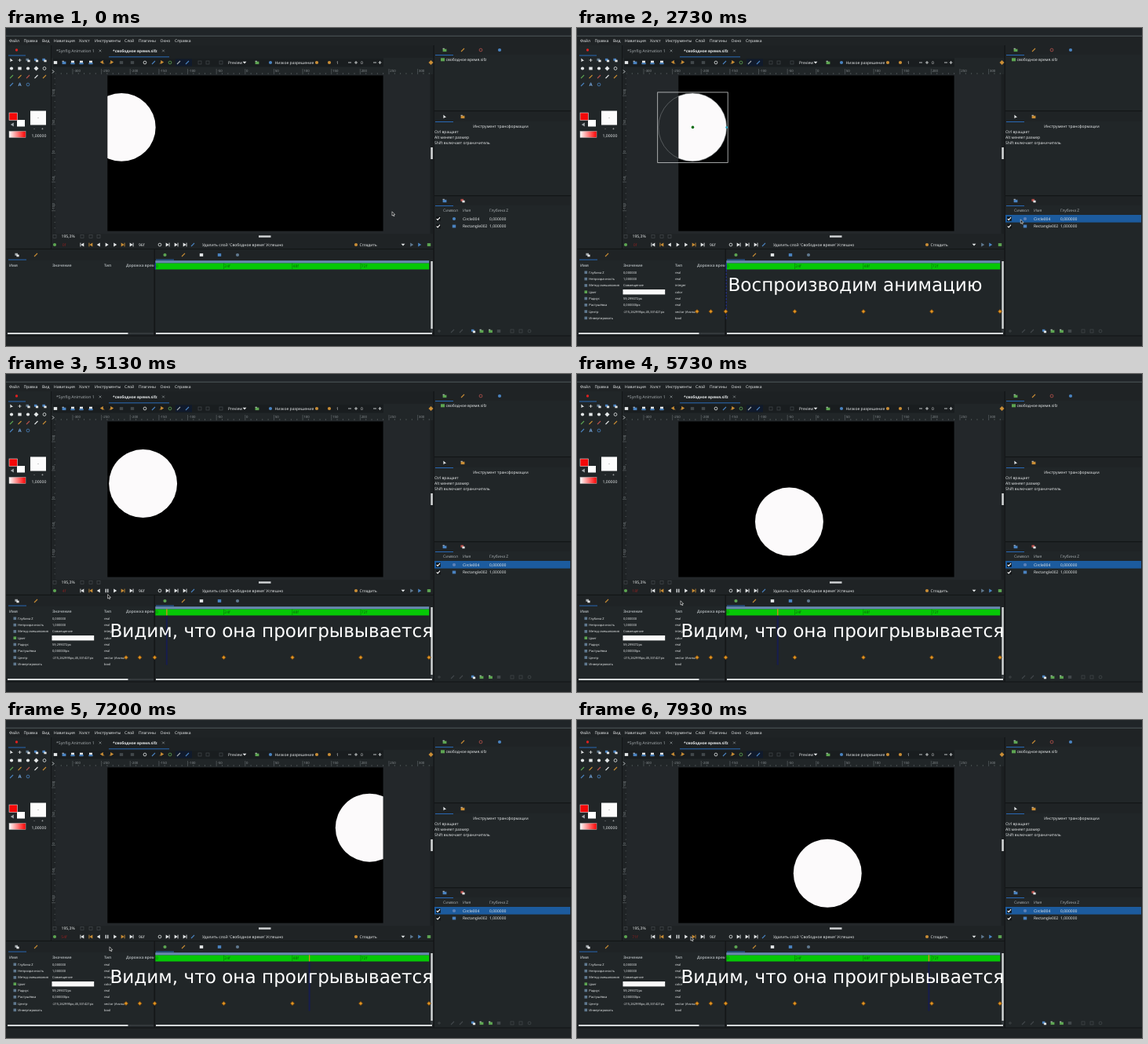
An HTML page with a canvas that plays this animation: 720 px wide and 405 px high, repeating every 8000 ms.

```html
<!DOCTYPE html>
<html lang="ru">
<head>
<meta charset="utf-8">
<style>
html, body { margin: 0; width: 100%; height: 100%; overflow: hidden; background: #1f2325; }
canvas { display: block; width: 720px; height: 405px; }
</style>
</head>
<body>
<canvas id="stage" width="720" height="405"></canvas>
<script>
const ctx = document.getElementById('stage').getContext('2d');
const LOOP = 8000, TICK = 1000 / 15;
const SELECT_AT = 1870, CAPTION_AT = 2730, PLAY_AT = 4930;
const UI = '"Noto Sans", "Open Sans", sans-serif';
const WHITE = '#e4e7e8', GREY = '#a3a9ac', DIM = '#42484b';
const BLUE = '#4a83c0', SLATE = '#60798f', GREEN = '#5da552', GOLD = '#c98d35', RED = '#b8524c';

function rect(x, y, w, h, color) {
  ctx.fillStyle = color;
  ctx.fillRect(x, y, w, h);
}

function outline(x, y, w, h, color, width = 0.7) {
  ctx.strokeStyle = color;
  ctx.lineWidth = width;
  ctx.strokeRect(x, y, w, h);
}

function disc(x, y, r, color) {
  ctx.fillStyle = color;
  ctx.beginPath();
  ctx.arc(x, y, r, 0, 7);
  ctx.fill();
}

function ring(x, y, r, color, width = 0.8) {
  ctx.strokeStyle = color;
  ctx.lineWidth = width;
  ctx.beginPath();
  ctx.arc(x, y, r, 0, 7);
  ctx.stroke();
}

function poly(points, color) {
  ctx.fillStyle = color;
  ctx.beginPath();
  points.forEach(([x, y]) => ctx.lineTo(x, y));
  ctx.fill();
}

function line(x1, y1, x2, y2, color, width = 0.8) {
  ctx.strokeStyle = color;
  ctx.lineWidth = width;
  ctx.beginPath();
  ctx.moveTo(x1, y1);
  ctx.lineTo(x2, y2);
  ctx.stroke();
}

// y is the vertical middle of the line of text
function text(str, x, y, { size = 5, color = WHITE, weight = 400, align = 'left' } = {}) {
  ctx.font = `${weight} ${size}px ${UI}`;
  ctx.textAlign = align;
  ctx.fillStyle = color;
  ctx.fillText(str, x, y + size * 0.36);
}

function clipped(x, y, w, h, paint) {
  ctx.save();
  ctx.beginPath();
  ctx.rect(x, y, w, h);
  ctx.clip();
  paint();
  ctx.restore();
}

const shapes = {
  dot: (x, y, c) => disc(x, y, 2.1, c),
  ring: (x, y, c) => ring(x, y, 1.9, c),
  sq: (x, y, c) => rect(x - 2.2, y - 1.9, 4.4, 3.8, c),
  box: (x, y, c) => outline(x - 2, y - 2, 4, 4, c),
  slash: (x, y, c) => line(x - 2, y + 2, x + 2, y - 2, c, 1.1),
  plus: (x, y, c) => { line(x - 2, y, x + 2, y, c); line(x, y - 2, x, y + 2, c); },
  minus: (x, y, c) => line(x - 2, y, x + 2, y, c),
  cross: (x, y, c) => { line(x - 1.4, y - 1.4, x + 1.4, y + 1.4, c, 0.6); line(x - 1.4, y + 1.4, x + 1.4, y - 1.4, c, 0.6); },
  down: (x, y, c) => poly([[x - 2.4, y - 1.2], [x + 2.4, y - 1.2], [x, y + 1.5]], c),
  right: (x, y, c) => poly([[x - 1.8, y - 2.4], [x + 2.2, y], [x - 1.8, y + 2.4]], c),
  left: (x, y, c) => poly([[x + 1.8, y - 2.4], [x - 2.2, y], [x + 1.8, y + 2.4]], c),
  next: (x, y, c) => { shapes.right(x - 0.5, y, c); rect(x + 1.6, y - 2.4, 0.9, 4.8, c); },
  prev: (x, y, c) => { shapes.left(x + 0.5, y, c); rect(x - 2.5, y - 2.4, 0.9, 4.8, c); },
  pause: (x, y, c) => { rect(x - 1.9, y - 2.3, 1.3, 4.6, c); rect(x + 0.6, y - 2.3, 1.3, 4.6, c); },
  back: (x, y, c) => { shapes.left(x - 1, y - 0.5, c); line(x, y - 0.5, x + 2.3, y + 1.5, c); },
  fwd: (x, y, c) => { shapes.right(x + 1, y - 0.5, c); line(x, y - 0.5, x - 2.3, y + 1.5, c); },
  arrow: (x, y, c) => poly([[x - 1.7, y - 2.5], [x + 2, y + 0.8], [x, y + 0.9], [x - 1.5, y + 2.3]], c),
  diamond: (x, y, c) => poly([[x - 3, y], [x, y - 3], [x + 3, y], [x, y + 3]], c),
  check: (x, y, c) => { line(x - 2, y, x - 0.5, y + 1.6, c, 1.1); line(x - 0.7, y + 1.6, x + 2.2, y - 1.8, c, 1.1); },
  pair: (x, y, c) => { rect(x - 2.6, y - 2.2, 3.6, 3, c); rect(x - 0.6, y - 0.4, 3.2, 2.7, WHITE); },
  folder: (x, y, c) => { rect(x - 2.4, y - 2.2, 2.2, 1, WHITE); rect(x - 2.4, y - 1.3, 4.8, 3.4, c); },
  save: (x, y, c) => { rect(x - 2, y - 2.3, 4, 2.6, WHITE); rect(x - 2.6, y + 0.2, 5.2, 2, c); },
};
const palette = { w: WHITE, g: GREY, d: DIM, b: BLUE, s: SLATE, n: GREEN, o: GOLD, r: RED };

// items look like "shape x colour", separated by commas
function icons(y, list) {
  list.split(',').forEach(item => {
    const [shape, x, color] = item.trim().split(' ');
    shapes[shape](+x, y, palette[color]);
  });
}

function drawPanels() {
  rect(0, 0, 720, 405, '#1f2325');
  rect(0, 0, 720, 9.5, '#202528');
  rect(0, 9.6, 720, 1.2, '#485154');
  rect(2, 22, 55, 258, '#212628');
  rect(58, 22, 487, 16, '#1d2123');
  rect(58, 38, 487, 12, '#212628');
  rect(60, 38.5, 421, 11, '#191d1f');
  rect(58, 50, 487, 9, '#212628');
  rect(63, 59, 477, 203, '#23272a');
  rect(129.3, 60.4, 351.3, 198.2, '#000');
  rect(2, 296, 186, 95, '#212628');
  rect(191, 307, 349, 81, '#212628');
  rect(546, 34, 173, 71, '#212628');
  rect(546, 119, 173, 94, '#212628');
  rect(546, 226, 173, 166, '#212628');
  [[0, 281, 545, 1], [57, 22, 1, 259], [188.6, 282, 1.2, 110], [544.5, 22, 1.2, 370],
   [546, 105, 174, 1.2], [546, 213, 174, 1.2], [0, 391.5, 720, 1]]
    .forEach(r => rect(...r, '#121516'));
}

function drawMenuAndTabs() {
  [['Файл', 4], ['Правка', 22.5], ['Вид', 46], ['Навигация', 61], ['Холст', 93], ['Инструменты', 113],
   ['Слой', 151], ['Плагины', 169], ['Окно', 196.5], ['Справка', 215]]
    .forEach(([label, x]) => text(label, x, 16));
  text('*Synfig Animation 1', 64, 29, { size: 5.2, color: GREY });
  text('*свободное время.sifz', 136, 29, { weight: 700, size: 4.9 });
  icons(29, 'cross 120 g,cross 200.5 g');
  [[131, 36.3, 77], [3, 34.5, 22], [547, 34, 23], [547, 119, 23], [547, 226, 23], [3, 294.6, 23], [191, 294.6, 23]]
    .forEach(([x, y, w]) => rect(x, y, w, 1, '#2868b4'));
}

function drawToolbox() {
  disc(13.5, 28, 1.7, '#e02020');
  icons(41, 'arrow 7 w,plus 17.5 w,pair 28 s,pair 38.5 b,pair 49 b');
  icons(51.5, 'dot 7 w,sq 17.5 w,dot 28 w,diamond 38.5 w,ring 49 w');
  icons(62, 'slash 7 n,slash 17.5 o,slash 28 r,slash 38.5 w,slash 49 o');
  icons(72, 'slash 7 b,ring 28 b');
  text('A', 17.5, 72, { size: 6, color: '#77a9e0', weight: 700, align: 'center' });
  rect(14, 117, 10, 8.5, '#fff');
  rect(4, 108, 10.5, 9.5, '#f40808');
  outline(4, 108, 10.5, 9.5, '#ddd', 0.6);
  icons(123, 'left 8 g');
  rect(31, 105.5, 20, 18, '#fcfcfc');
  disc(41, 114.5, 0.5, '#777');
  text('-', 36, 128, { align: 'center' });
  text('+', 46.5, 128, { align: 'center' });
  const fade = ctx.createLinearGradient(4, 0, 25, 0);
  fade.addColorStop(0, '#fff');
  fade.addColorStop(1, '#f00');
  rect(4, 131.5, 21, 8, fade);
  outline(4, 131.5, 21, 8, '#bbb', 0.5);
  text('1,00000', 32.5, 137, { size: 5.1 });
}

function drawToolbar() {
  rect(216, 39.5, 21, 9, '#101a2c');
  icons(44, 'sq 63 w,folder 74 b,save 85 b,save 96 b,save 108 b,back 123 o,fwd 134 o,sq 147 d,sq 161 d,ring 177 w,' +
    'slash 188 b,fwd 198 o,ring 209 n,slash 220 g,slash 231 b,box 247 d,box 257 d,box 274 d,down 304 w,' +
    'folder 320 n,dot 337 b,dot 396 o,dot 412 o,minus 438 w,plus 446 w,minus 470 w,plus 476.5 w,diamond 541.5 o');
  text('Preview', 283, 44);
  text('Низкое разрешение', 342.5, 44);
  text('1', 421, 44);
  text('0', 452, 44);
}

function drawRulers() {
  const ink = '#858b8e', step = 36.64;
  clipped(63, 50, 477, 9, () => {
    for (let i = -33; i <= 33; i++) {
      const x = 304.8 + i * step / 5;
      line(x, i % 5 ? 57 : 52, x, 59, ink, 0.4);
      if (i % 5 === 0) text(i * 10, x + 1.3, 54, { size: 4.3, color: ink });
    }
  });
  clipped(58, 60, 5, 202, () => {
    for (let i = -13; i <= 13; i++) {
      const y = 159.5 - i * step / 5;
      line(i % 5 ? 61.5 : 58, y, 63, y, ink, 0.4);
      if (i % 5) continue;
      ctx.save();
      ctx.translate(60, y - 1);
      ctx.rotate(-Math.PI / 2);
      text(i * 10, 0, 0, { size: 4.3, color: ink });
      ctx.restore();
    }
  });
  line(59, 53.5, 61, 55.5, WHITE, 0.9);
  line(61, 55.5, 59, 57.5, WHITE, 0.9);
  rect(541, 59, 3.5, 203, '#1b1f21');
  rect(541.3, 152, 2.5, 15, '#d5d8d9');
  rect(322, 264.3, 15.5, 2.4, '#d5d8d9');
}

function drawPlayback(playing, frame) {
  icons(265.5, 'box 62 d,box 97 d,box 108 d,box 118 d');
  text('195,3%', 70.5, 265.5, { size: 5.1 });
  icons(276, `dot 62 n,prev 97 w,prev 108 o,left 118 w,${playing ? 'pause' : 'right'} 128.5 w,right 139 w,` +
    'next 149 o,next 160 w,ring 196 w,next 206 w,next 217 w,next 228 w,slash 238 b,' +
    'dot 446 o,down 506 w,right 517 s,right 527 b,sq 539 n');
  text(`${frame}f`, 74, 276, { color: '#8a2020', align: 'center' });
  text('96f', 169, 276);
  text("Удалить слой 'Свободное время' Успешно", 250, 276);
  text('Сгладить', 450.5, 276);
}

function drawParameters(selected) {
  icons(289, 'pair 14 g,slash 38 o');
  const head = { color: GREY, weight: 700, size: 4.8 };
  text('Имя', 4, 302, head);
  text('Значение', 59, 302, head);
  text('Тип', 125, 302, head);
  clipped(150, 296, 38.5, 12, () => text('Дорожка времени', 153, 302, head));
  rect(2, 388, 186, 2, '#34393c');
  rect(2, 388, 153.5, 2, '#d5d8d9');
  if (!selected) return;

  [['Глубина Z', '0,000000', 'real', 's'], ['Непрозрачность', '1,000000', 'real', 's'],
   ['Метод смешивания', 'Совмещение', 'integer', 's'], ['Цвет', '', 'color', 'n'],
   ['Радиус', '59,299072px', 'real', 's'], ['Растушёвка', '0,000000px', 'real', 's'],
   ['Центр', '-215,262995px,45,331421px', 'vector (Анимация)', 's'], ['Инвертировать', '', 'bool', 's']]
    .forEach(([name, value, type, tint], i) => {
      const y = 311.3 + i * 8.3;
      rect(9.5, y - 1.8, 3.6, 3.6, palette[tint]);
      text(name, 15.3, y, { size: 4 });
      text(value, 59, y, { size: 4 });
      clipped(120, y - 4, 31, 8, () => text(type, 125, y, { size: 4 }));
    });
  rect(58.5, 333, 53.7, 6.4, '#fbfbfb');
}

function drawTimeline(selected, frame) {
  const frameX = f => 190.3 + f * 3.635;
  icons(289, 'dot 202.5 n,slash 226 o,sq 249 w,sq 272 b,dot 295 s');
  rect(190.3, 296.2, 348.9, 3.4, '#6889b0');
  rect(190.3, 299.6, 348.9, 7.9, '#06c806');
  for (let f = 0; f < 96; f += 24) {
    line(frameX(f), 299.6, frameX(f), 307, '#0a7a0a', 0.6);
    text(f ? `${f}f` : '0', frameX(f) + (f ? 0.8 : 0.6), 303.3, { color: '#0a640a' });
  }
  rect(541, 297, 3, 91, '#34393c');
  rect(541.4, 297, 2.3, 86, '#d5d8d9');
  rect(191, 388, 352, 2, '#d5d8d9');

  const x = frameX(frame);
  if (selected) {
    if (frame) rect(x - 1, 307.5, 2, 63, '#171d4e');
    else for (let y = 308; y < 370; y += 4) rect(x - 0.6, y, 1, 2.6, '#2636a0');
    [153, 170.5, 189.5, 277.5, 365, 452, 539].forEach(k => {
      shapes.diamond(k, 361, '#7c4a0c');
      poly([[k - 2, 361], [k, 359], [k + 2, 361], [k, 363]], '#df9424');
    });
  }
  rect(x - 0.6, 299.2, 1.3, 8.3, frame ? '#d89018' : '#2636a0');
}

function drawRightPanels(selected) {
  icons(28, 'folder 559 n,slash 582 o,ring 605 r,dot 629 b');
  rect(554, 38.3, 5, 4, GREEN);
  text('свободное время.sifz', 560.5, 40.5);
  icons(113, 'arrow 559 w,folder 582 o');
  text('Инструмент трансформации', 630.5, 125, { align: 'center' });
  ['Ctrl вращает', 'Alt меняет размер', 'Shift включает ограничитель']
    .forEach((hint, i) => text(hint, 546, 132 + i * 7, { size: 4.95 }));
  icons(220, 'folder 559 b,pair 582 r');
  [['Символ', 557], ['Имя', 582], ['Глубина Z', 616]]
    .forEach(([label, x]) => text(label, x, 232.5, { color: GREY }));
  if (selected) rect(546, 238, 173, 9.6, '#1c5b9e');
  [['Circle004', '0,000000', 243], ['Rectangle002', '1,000000', 252.5]].forEach(([name, depth, y]) => {
    rect(548, y - 2.8, 5.8, 5.6, '#111416');
    shapes.check(550.8, y, '#fff');
    text(name, 582, y, { size: 4.95 });
    text(depth, 616, y);
  });
  shapes.dot(571, 243, selected ? '#5d82b8' : BLUE);
  shapes.sq(571, 252.5, BLUE);
  icons(386, 'plus 552 d,slash 569 d,slash 580 d,pair 595.5 b,folder 606 n,folder 617.5 n,sq 628 d,box 645 d,box 656 d,ring 667 d');
}

// Cubic through keys spaced 24 frames apart, with averaged tangents
function spline(keys, frame) {
  const i = Math.min(Math.floor(frame / 24), keys.length - 2);
  const u = frame / 24 - i, last = keys.length - 1;
  const tangent = k => k === 0 ? keys[1] - keys[0] : k === last ? keys[k] - keys[k - 1] : (keys[k + 1] - keys[k - 1]) / 2;
  return keys[i] * (1 + 2 * u) * (1 - u) ** 2 + tangent(i) * u * (1 - u) ** 2 +
    keys[i + 1] * u * u * (3 - 2 * u) + tangent(i + 1) * u * u * (u - 1);
}

function drawBall(frame, handles) {
  const x = spline([147.2, 312, 482, 312, 147.2], frame);
  const y = spline([126.4, 195.6, 126.4, 195.6, 126.4], frame);
  clipped(129.3, 60.4, 351.3, 198.2, () => disc(x, y, 43.45, '#fcfafb'));
  if (!handles) return;
  ring(x, y, 43.45, '#777c7e', 0.6);
  outline(x - 44.5, y - 44.5, 89.5, 89.5, '#c9cbcc', 0.8);
  disc(x + 0.3, y, 1.8, '#0b6e12');
  disc(x + 43.6, y, 1.5, '#2a9db8');
}

function drawCaption(t) {
  if (t < CAPTION_AT) return;
  ctx.font = '23.15px "DejaVu Sans", sans-serif';
  ctx.textAlign = 'left';
  ctx.fillStyle = '#fff';
  if (t < PLAY_AT) ctx.fillText('Воспроизводим анимацию', 192.4, 335.3);
  else ctx.fillText('Видим, что она проигрывывается', 132.4, 335.3);
}

const cursorPath = [[600, 492, 233.8], [1270, 571, 242], [1470, 571, 242], [1530, 572.7, 243.5], [2670, 572.7, 243.5],
  [3530, 147, 258.5], [3600, 147, 258.5], [4070, 128, 275], [4930, 128, 275], [5400, 132, 288.8], [7470, 132, 288.8], [7930, 145, 275.8]];

function drawCursor(t) {
  const next = cursorPath.findIndex(p => p[0] > t);
  let [, x, y] = cursorPath[next < 0 ? cursorPath.length - 1 : Math.max(next - 1, 0)];
  if (next > 0) {
    const [start] = cursorPath[next - 1], [end, toX, toY] = cursorPath[next];
    const u = (t - start) / (end - start), ease = u * u * (3 - 2 * u);
    x += (toX - x) * ease;
    y += (toY - y) * ease;
  }
  const shape = [[0, 0], [0, 5.3], [1.2, 4.3], [2, 6], [2.9, 5.6], [2.1, 3.9], [3.7, 3.8]].map(([a, b]) => [x + a, y + b]);
  poly(shape, '#0b0c0d');
  ctx.closePath();
  ctx.strokeStyle = '#e8eaea';
  ctx.lineWidth = 0.65;
  ctx.stroke();
}

function draw(tick) {
  const t = tick * TICK + 4;
  const selected = t >= SELECT_AT, playing = t >= PLAY_AT;
  const frame = playing ? Math.max(0, Math.round(18.1 + (tick - 86) * 1.613)) : 0;
  ctx.textRendering = 'geometricPrecision';
  drawPanels();
  drawMenuAndTabs();
  drawToolbox();
  drawToolbar();
  drawRulers();
  drawBall(frame, selected && !playing);
  drawPlayback(playing, frame);
  drawParameters(selected);
  drawTimeline(selected, frame);
  drawRightPanels(selected);
  drawCaption(t);
  drawCursor(t);
}

let shown = -1;
function loop() {
  const tick = Math.floor((performance.now() % LOOP + 4) / TICK);
  if (tick !== shown) draw(shown = tick);
  requestAnimationFrame(loop);
}
loop();
</script>
</body>
</html>
```
